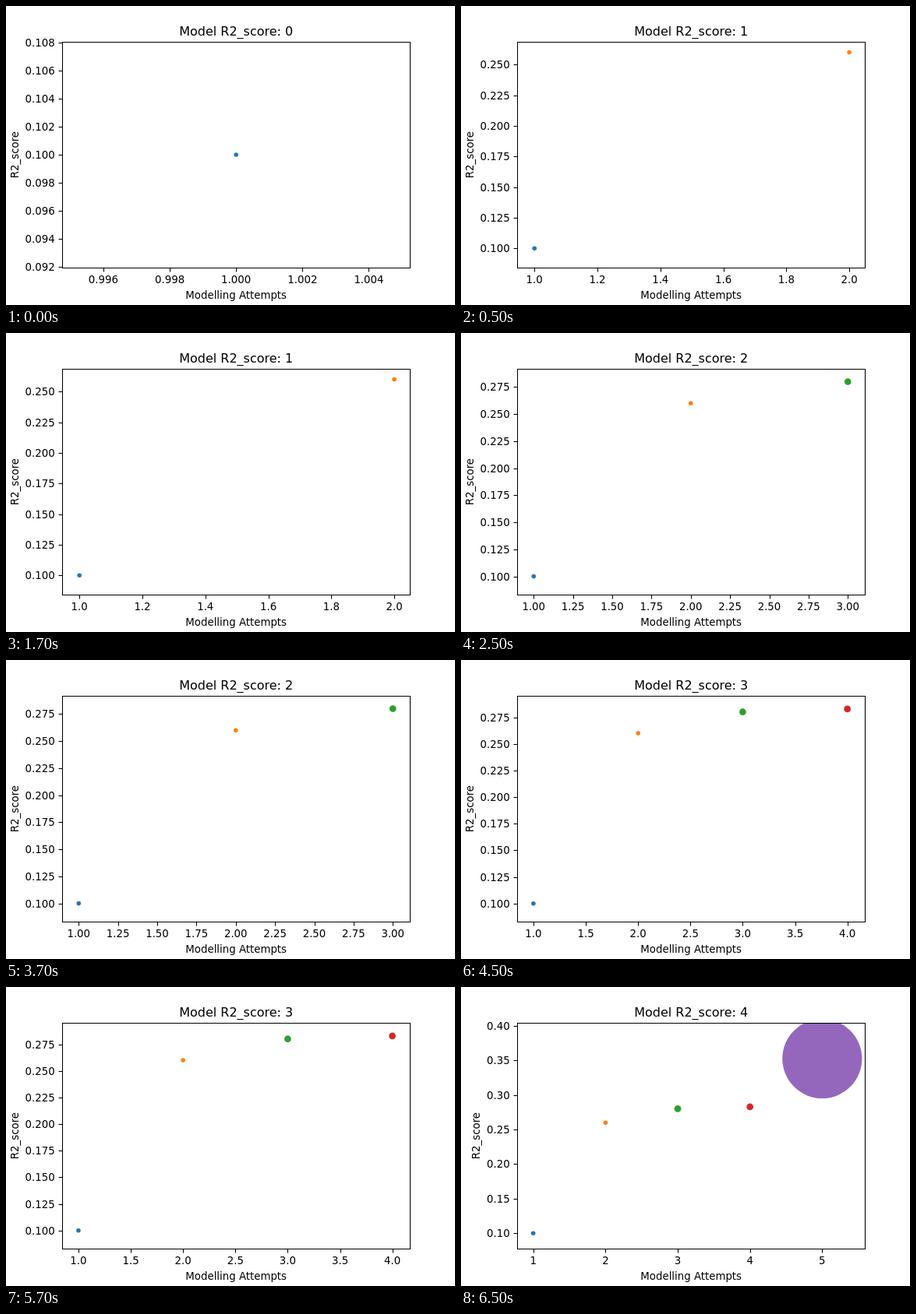
These frames come from a looping animation (576x384 px, 8000 ms). An HTML page:

```html
<!DOCTYPE html>
<html lang="en">
<head>
<meta charset="utf-8">
<title>Model R2_score</title>
<style>
  html, body { margin: 0; width: 100%; height: 100%; overflow: hidden; background: #fff; }
  svg { display: block; }
  text { font: 13.333px "DejaVu Sans", sans-serif; }
  .title { font-size: 16px; }
  path { fill: none; stroke: #000; stroke-width: 1.067; }
</style>
</head>
<body>
<svg id="chart" width="576" height="384" viewBox="0 0 576 384"></svg>
<script>
const LEFT = 72, RIGHT = 518.4, TOP = 46.08, BOTTOM = 336;
const WIDTH = RIGHT - LEFT, HEIGHT = BOTTOM - TOP;
const MID_X = (LEFT + RIGHT) / 2, MID_Y = (TOP + BOTTOM) / 2;
const EDGE = 0.667, LOOP = 8000;

// Each attempt: score, marker radius, colour, [tick step, decimals] for both axes
const attempts = [
  { score: 0.1, r: 2.128, color: '#1f77b4', start: 0, xTick: [0.002, 3], yTick: [0.002, 3] },
  { score: 0.26, r: 2.128, color: '#ff7f0e', start: 500, xTick: [0.2, 1], yTick: [0.025, 3] },
  { score: 0.28, r: 3.7, color: '#2ca02c', start: 2500, xTick: [0.25, 2], yTick: [0.025, 3] },
  { score: 0.2828, r: 3.7, color: '#d62728', start: 4500, xTick: [0.5, 1], yTick: [0.025, 3] },
  { score: 0.3525, r: 50.4, color: '#9467bd', start: 6500, xTick: [1, 0], yTick: [0.05, 2] }
];

// An axis grows to hold each new marker, measured at the previous scale, plus 5% margins
function growAxis(values, length) {
  let min = Infinity, max = -Infinity, scale = length;
  return values.map((v, i) => {
    const half = attempts[i].r / scale;
    min = Math.min(min, v - half);
    max = Math.max(max, v + half);
    const pad = (max - min) * 0.05;
    scale = length / (max - min + 2 * pad);
    return { lo: min - pad, hi: max + pad, scale };
  });
}
const xAxes = growAxis(attempts.map((a, i) => i + 1), WIDTH);
const yAxes = growAxis(attempts.map(a => a.score), HEIGHT);

function ticks({ lo, hi }, [step, digits]) {
  const list = [];
  for (let n = Math.ceil(lo / step); n * step <= hi; n++) {
    list.push([n * step, (n * step).toFixed(digits)]);
  }
  return list;
}

const text = (x, y, label, anchor = 'middle', extra = '') =>
  `<text x="${x}" y="${y}" text-anchor="${anchor}" ${extra}>${label}</text>`;
const line = d => `<path d="${d}"/>`;

function draw(n) {
  const ax = xAxes[n], ay = yAxes[n], { xTick, yTick } = attempts[n];
  const px = v => LEFT + (v - ax.lo) * ax.scale;
  const py = v => BOTTOM - (v - ay.lo) * ay.scale;

  let out = `<clipPath id="area"><rect x="${LEFT}" y="${TOP}" width="${WIDTH}" height="${HEIGHT}"/></clipPath>`;
  out += '<g clip-path="url(#area)">';
  attempts.slice(0, n + 1).forEach((a, i) => {
    out += `<circle cx="${px(i + 1)}" cy="${py(a.score)}" r="${a.r + EDGE}" fill="${a.color}"/>`;
  });
  out += '</g>';

  for (const [v, label] of ticks(ax, xTick)) {
    const x = Math.round(px(v));
    out += line(`M${x + 0.5} 336.5v5`) + text(px(v), 356, label);
  }
  for (const [v, label] of ticks(ay, yTick)) {
    const y = Math.round(py(v));
    out += line(`M67.5 ${y + 0.5}h5`) + text(62.67, y + 5, label, 'end');
  }
  out += line('M72.5 46.5H518.5V336.5H72.5Z');

  const labelX = yTick[1] === 3 ? 16 : 24;
  out += text(MID_X, 38, `Model R2_score: ${n}`, 'middle', 'class="title"');
  out += text(MID_X, 376, 'Modelling Attempts');
  out += text(0, 0, 'R2_score', 'middle', `transform="translate(${labelX} ${MID_Y}) rotate(-90)"`);
  chart.innerHTML = out;
}

const chart = document.getElementById('chart');
const begin = performance.now();
let shown = -1;

function tick() {
  const t = (performance.now() - begin) % LOOP;
  const n = attempts.filter(a => a.start <= t).length - 1;
  if (n !== shown) draw(shown = n);
  requestAnimationFrame(tick);
}
tick();
</script>
</body>
</html>
```
